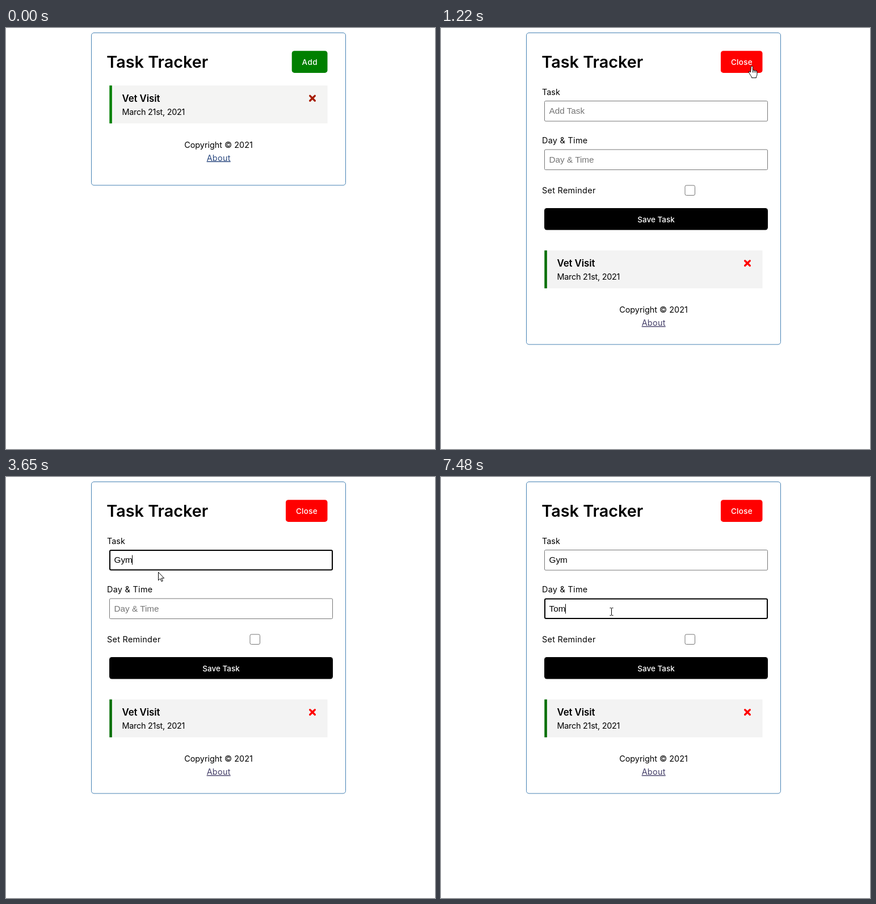
Animation of 756 by 741 pixels, one loop 8000 ms. Source, as an HTML page:

```html
<!DOCTYPE html>
<html lang="en">
<head>
<meta charset="utf-8">
<title>Task list</title>
<style>
html, body { margin: 0; width: 100%; height: 100%; overflow: hidden; background: #fff; }
svg { display: block; }
text { font: 400 14.4px Inter, "Open Sans", sans-serif; font-optical-sizing: none; white-space: pre; }
.wide { letter-spacing: .3px; }
.mid { text-anchor: middle; }
.btn { font-size: 13.5px; font-weight: 500; fill: #fff; text-anchor: middle; }
.field text { font: 15.3px "Liberation Sans", Arial, sans-serif; }
.field rect, .box { fill: #fff; stroke: #767676; }
</style>
</head>
<body>
<svg width="756" height="741" viewBox="0 0 756 741">
  <rect id="card" x="150.5" y="8.5" width="448" rx="4.5" fill="#fff" stroke="steelblue"/>
  <text x="177.3" y="70" style="font-size:28.8px;font-weight:560">Task Tracker</text>

  <g id="add">
    <rect x="503.7" y="40.2" width="62.8" height="38.7" rx="4.5" fill="green"/>
    <text class="btn" x="535.3" y="64.7" letter-spacing=".4">Add</text>
  </g>

  <g id="form">
    <rect x="493" y="40.2" width="73.5" height="38.7" rx="4.5" fill="red"/>
    <text class="btn" x="530" y="64.7" letter-spacing=".3">Close</text>
    <text x="178" y="118">Task</text>
    <g class="field" id="task">
      <rect x="182.5" y="128.5" width="393" height="35.5" rx="2"/>
      <text x="190.5" y="151"></text>
      <path d="M0 137.5V154.5" stroke="#000"/>
    </g>
    <text class="wide" x="178" y="203">Day &amp; Time</text>
    <g class="field" id="day">
      <rect x="182.5" y="214" width="393" height="35.5" rx="2"/>
      <text x="190.5" y="236.5"></text>
      <path d="M0 223.5V240.5" stroke="#000"/>
    </g>
    <text class="wide" x="178" y="291">Set Reminder</text>
    <rect class="box" x="430" y="277" width="17.5" height="17.5" rx="2.5"/>
    <rect x="182" y="317" width="394" height="38.6" rx="4.5"/>
    <text class="btn" x="379" y="341.5">Save Task</text>
  </g>

  <g id="list">
    <rect id="row" x="182.3" y="101.2" width="384.3" height="66.7"/>
    <rect id="bar" x="182.3" y="101.2" width="4.5" height="66.7"/>
    <text x="204.5" y="129.5" style="font-size:16.85px;font-weight:580" letter-spacing="-.1">Vet Visit</text>
    <text x="204.5" y="153" letter-spacing="-.25">March 21st, 2021</text>
    <path id="cross" d="M535.7 119.4l8.6 8.6m0-8.6l-8.6 8.6" stroke-width="3.4" stroke-linecap="round"/>
    <text class="mid" x="374.5" y="211">Copyright © 2021</text>
    <text id="about" class="mid wide" x="374.7" y="233.5" text-decoration="underline">About</text>
  </g>

  <circle id="press" cx="547.5" cy="67" r="10.7" fill="#ff0" opacity=".52"/>
  <g id="mouse" stroke="#000" fill="#fff" stroke-linejoin="round">
    <path id="arrow" d="M.5.5v14.4l3.3-3 2.3 5 2.1-.9-2.2-4.9h4.6z"/>
    <path id="beam" fill="none" d="M-3-6.5h2.2l.8.7.8-.7H3M0-6V6M-3 6.5h2.2l.8-.7.8.7H3"/>
    <path id="hand" d="M-1.5 1.5q0-1.5 1.5-1.5t1.5 1.5v6q1-1.2 2.6.2 1.6-.7 2.6.6 2-.4 2.3 1.4v5q0 2-1.5 4v2h-8v-1.5q-2-2.5-3.5-5.5-2-3-1.5-4 1.3-1.2 3 1.2zM1.5 7.5v4M4.1 8v3.5M6.7 8.5v3"/>
  </g>
</svg>
<script>
const LOOP = 8000, TICK = 70, OPEN = 1220, SHIFT = 290;
const $ = id => document.getElementById(id);
const show = (id, on) => $(id).setAttribute('visibility', on ? 'visible' : 'hidden');
const set = (el, attrs) => { for (const k in attrs) el.setAttribute(k, attrs[k]); };
const within = (t, a, b) => t >= a && t < b;

// time, x, y of the pointer's hot spot
const path = [
  [140, 224, 602], [500, 370, 370], [930, 552, 81], [990, 548, 67], [1260, 548, 67],
  [1610, 285, 177], [1750, 273, 150], [1860, 270, 150], [1960, 268, 152], [2090, 268, 167],
  [4060, 268, 167], [4130, 441, 84], [4300, 441, 84], [4690, 312, 232], [4760, 310, 237],
  [5220, 310, 237], [5320, 300, 237], [LOOP, 300, 237]
];

const fields = [
  { id: 'task', hint: 'Add Task', focus: [1930, 4840], top: 128, word: 'Gym',
    keys: [2960, 3190, 3650], off: [[2410, 2960], [4130, 4660]] },
  { id: 'day', hint: 'Day & Time', focus: [4840, LOOP], top: 213.5, word: 'Tom',
    keys: [7080, 7250, 7480], off: [[5350, 5850], [6380, 6930]] }
];

function pointAt(t) {
  const s = Math.floor(t / TICK) * TICK;
  const i = Math.max(1, path.findIndex(p => p[0] > s));
  const [a, b] = [path[i - 1], path[i]];
  const k = Math.max(0, (s - a[0]) / (b[0] - a[0]));
  return [1, 2].map(n => Math.round(a[n] + (b[n] - a[n]) * k));
}

function drawField(f, t, x, y) {
  const [rect, text, caret] = $(f.id).children;
  const typed = f.word.slice(0, f.keys.filter(k => t >= k).length);
  const focus = within(t, ...f.focus);
  const hover = within(x, 182, 576) && within(y, f.top, f.top + 36);
  const inset = focus ? .5 : 0;
  set(rect, {
    x: 182.5 + inset, y: f.top + .5 + inset,
    width: 393 - 2 * inset, height: 35.5 - 2 * inset,
    'stroke-width': focus ? 2 : 1
  });
  rect.style.stroke = focus ? '#000' : hover ? '#444' : '#767676';
  text.textContent = typed || f.hint;
  text.style.fill = typed ? '#000' : '#757575';
  const end = typed ? Math.round(190 + text.getComputedTextLength()) : 190;
  caret.setAttribute('transform', `translate(${end + .5} 0)`);
  const lit = focus && !f.off.some(o => within(t, ...o));
  caret.style.display = lit ? '' : 'none';
  return hover;
}

function draw(t) {
  const open = t >= OPEN, pressed = within(t, 1080, OPEN);
  const [x, y] = pointAt(t);

  set($('card'), { height: open ? 548.5 : 268.3 });
  $('form').style.display = open ? '' : 'none';
  show('add', !open);
  set($('add'), { transform: pressed ? 'translate(10.7 1.2) scale(.98)' : '' });
  set($('list'), { transform: `translate(0 ${open ? SHIFT + .3 : 0})` });
  set($('row'), { fill: open ? '#f3f3f3' : '#f4f4f3' });
  set($('bar'), { fill: open ? '#006e00' : 'green' });
  set($('cross'), { stroke: open ? 'red' : '#a61c00' });
  set($('about'), { fill: open ? '#46406a' : '#2c4a80' });

  const overField = fields.map(f => open && drawField(f, t, x, y)).some(Boolean);
  const overButton = within(x, open ? 493 : 504, 567) && within(y, 40, 79);
  show('press', pressed);
  set($('mouse'), { transform: `translate(${x + (overField ? .5 : 0)} ${y})` });
  $('mouse').style.display = t < 140 ? 'none' : '';
  show('beam', overField);
  show('hand', overButton);
  show('arrow', !overField && !overButton);
}

const start = performance.now();
function frame() {
  draw((performance.now() - start) % LOOP);
  requestAnimationFrame(frame);
}
frame();
</script>
</body>
</html>
```
